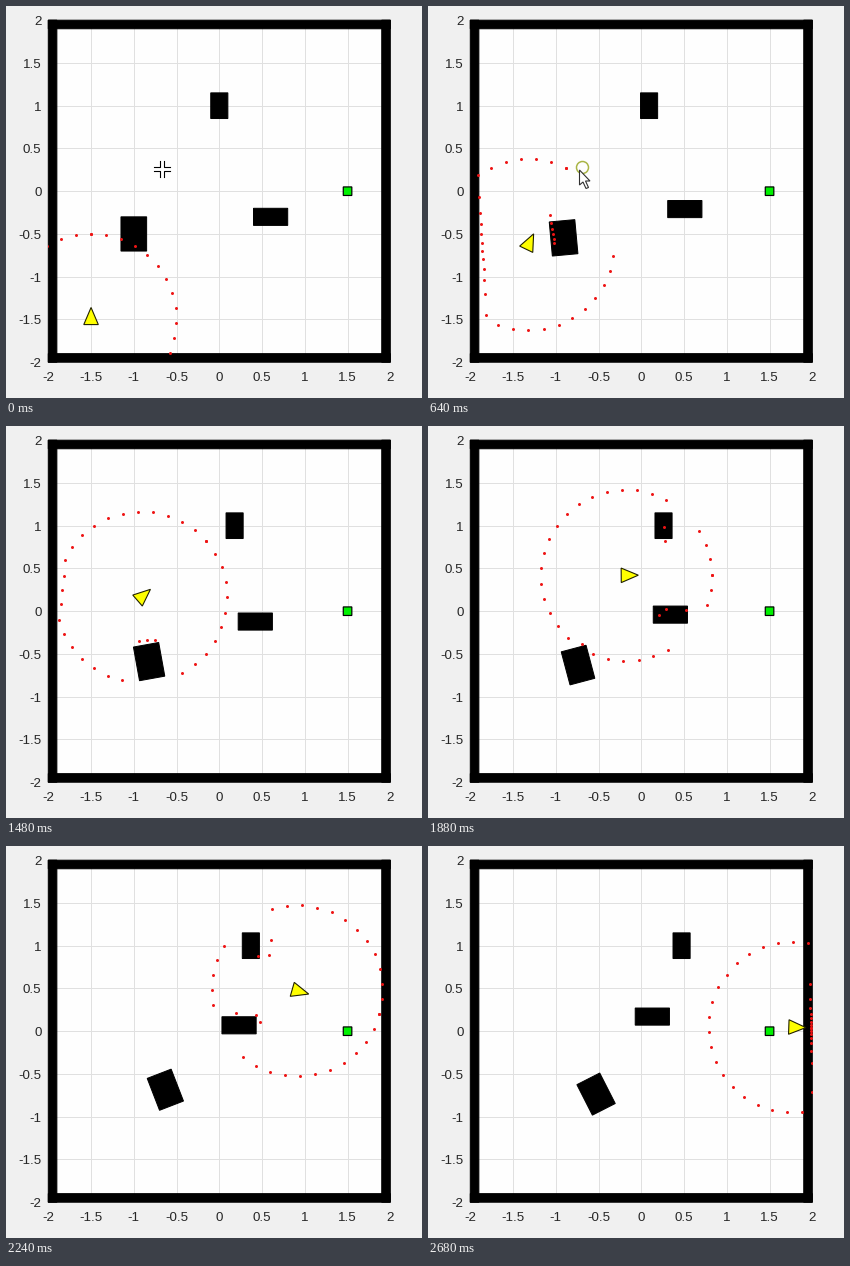
Write a matplotlib script that moves like this. It is 416 px wide and 392 px high and loops after 2800 ms.

```python
import numpy as np
import matplotlib.pyplot as plt
from matplotlib.animation import FuncAnimation
from matplotlib.patches import Circle, Polygon, Rectangle

W, H, DPI = 416, 392, 100
PX = 72 / DPI            # one pixel in points
FRAMES, INTERVAL = 70, 40
LEFT, TOP, SIDE = 42.3, 14.2, 342
INNER = 1.9              # inner face of the walls
SPEED, LAG = 9.8, 0.0085

# simulation clock against frame number (the simulation runs unevenly)
TICKS = [1, 16, 29, 37, 47, 56, 67]
CLOCK = [0, .091, .118, .179, .260, .369, .471]

# way points of the robot: clock time, x, y, heading in degrees
WAY = np.array([
    (0, -1.500, -1.500, 90), (.075, -1.396, -.762, 58),
    (.091, -1.320, -.625, 64.3), (.118, -1.240, -.333, 65.5),
    (.179, -.911, .164, 41), (.260, -.175, .420, .5),
    (.369, .911, .473, -16), (.450, 1.580, .060, -5),
    (.471, 1.785, .047, -2)])

# obstacles: start, velocity, size, spin
BOXES = [((0, 1), (1, 0), (.2, .3), 0),
         ((.6, -.3), (-1, 1), (.4, .2), 0),
         ((-1, -.5), (1, -.5), (.3, .4), 1)]

ROBOT = np.array([(.14, 0), (-.06, .085), (-.06, -.085)])
BEAMS = np.linspace(0, 2 * np.pi, 36)


def rotate(points, angle):
    c, s = np.cos(angle), np.sin(angle)
    return np.asarray(points) @ np.array([(c, s), (-s, c)])


def pose(t):
    """Position and heading on a Hermite path through the way points."""
    times = WAY[:, 0]
    k = int(np.clip(np.searchsorted(times, t, 'right') - 1, 0, len(times) - 2))
    d = times[k + 1] - times[k]
    u = (t - times[k]) / d
    p, q = WAY[k, 1:3], WAY[k + 1, 1:3]
    a, b = np.radians(WAY[k:k + 2, 3])
    m = SPEED * d * np.array([np.cos(a), np.sin(a)])
    n = SPEED * d * np.array([np.cos(b), np.sin(b)])
    pos = ((2*u**3 - 3*u**2 + 1) * p + (u**3 - 2*u**2 + u) * m
           + (3*u**2 - 2*u**3) * q + (u**3 - u**2) * n)
    vel = (6 * (u**2 - u) * (p - q) + (3*u**2 - 4*u + 1) * m
           + (3*u**2 - 2*u) * n)
    return pos, np.arctan2(vel[1], vel[0])


def box_state(box, t):
    start, vel, size, spin = box
    return np.add(start, np.multiply(vel, t)), np.array(size) / 2, spin * t


def slab(origin, rays, half):
    """Entry and exit distance of each ray through a centred rectangle."""
    rays = np.where(np.abs(rays) < 1e-9, 1e-9, rays)
    a, b = (-half - origin) / rays, (half - origin) / rays
    return np.minimum(a, b).max(axis=1), np.maximum(a, b).min(axis=1)


def scan(t):
    """Beam lengths, limited to 1, measured at clock time t."""
    pos, head = pose(t)
    rays = np.column_stack([np.cos(head + BEAMS), np.sin(head + BEAMS)])
    _, wall = slab(pos, rays, INNER)
    reach = np.clip(wall, 0, 1)
    for box in BOXES:
        centre, half, turn = box_state(box, t)
        near, far = slab(rotate(pos - centre, -turn), rotate(rays, -turn), half)
        hit = (near < far) & (near > 0)
        reach = np.where(hit, np.minimum(reach, near), reach)
    return reach


fig = plt.figure(figsize=(W / DPI, H / DPI), dpi=DPI, facecolor='#f0f0f0')
ax = fig.add_axes([LEFT / W, 1 - (TOP + SIDE) / H, SIDE / W, SIDE / H],
                  facecolor='#fefefe')
ax.set(xlim=(-2, 2), ylim=(-2, 2))
for spine in ax.spines.values():
    spine.set_visible(False)
ax.set_xticks([])
ax.set_yticks([])

# overlay in pixels for labels and the pointer
top = fig.add_axes([0, 0, 1, 1])
top.set(xlim=(0, W), ylim=(H, 0))
top.axis('off')

unit = SIDE / 4
font = dict(family='Liberation Sans', size=13.33 * PX, color='#262626')
for v in np.arange(-2, 2.1, .5):
    if abs(v) < 2:
        style = dict(color='#e0e0e0', lw=PX, zorder=1)
        ax.axvline(v, **style)
        ax.axhline(v, **style)
    x, y = LEFT + (v + 2) * unit, TOP + (2 - v) * unit
    top.text(x, 375, f'{v:g}', ha='center', va='baseline', **font)
    top.text(35.5, y + 4.8, f'{v:g}', ha='right', va='baseline', **font)

solid = dict(fc='black', ec='black', lw=PX, snap=False)
thick = 2 - INNER
for x, y, w, h in [(-2, -2, 4, thick), (-2, INNER, 4, thick),
                   (-2, -2, thick, 4), (INNER, -2, thick, 4)]:
    ax.add_patch(Rectangle((x, y), w, h, clip_on=False, zorder=2, **solid))

ax.add_patch(Rectangle((1.45, -.05), .1, .1, fc='#00f000', ec='black',
                       lw=1.2 * PX, snap=False, zorder=3))
blocks = [ax.add_patch(Polygon(np.zeros((4, 2)), zorder=3, **solid))
          for _ in BOXES]
robot = ax.add_patch(Polygon(ROBOT, fc='#ffff00', ec='#202000',
                             lw=1.1 * PX, zorder=4))
dots, = ax.plot([], [], 'o', ms=3 * PX, mfc='#ee1414', mew=0, snap=False,
                zorder=5)

# pointer shapes: an open cross, then an arrow with a click ring
CX, CY = 155.5, 162.5
cross = [top.add_patch(Rectangle((CX - w / 2, CY - h / 2), w, h, fc='white', lw=0))
         for w, h in [(16, 4), (4, 16)]]
for sx in (-1, 1):
    for sy in (-1, 1):
        cross += top.plot([CX + 8 * sx, CX + 2 * sx, CX + 2 * sx],
                          [CY + 2 * sy, CY + 2 * sy, CY + 8 * sy],
                          color='black', lw=1.1 * PX)
ring = top.add_patch(Circle((154.5, 161.5), 6, fill=False, ec='#a9b545',
                            lw=1.5 * PX))
shape = [(0, 0), (0, 15), (3.5, 12), (6.5, 18.5), (9, 17.5), (6, 11), (10.5, 11)]
arrow = top.add_patch(Polygon(np.add(shape, (151.5, 164)), fc='white',
                              ec='#303030', lw=1.1 * PX))


def draw(n):
    t = np.interp(n, TICKS, CLOCK)
    for box, block in zip(BOXES, blocks):
        centre, half, turn = box_state(box, t)
        corners = half * np.array([(-1, -1), (1, -1), (1, 1), (-1, 1)])
        block.set_xy(centre + rotate(corners, turn))

    pos, head = pose(t)
    robot.set_xy(pos + rotate(ROBOT, head))
    # beams are measured one step earlier than they are drawn
    reach = scan(max(t - LAG, 0)) if n > 1 else np.ones(len(BEAMS))
    dots.set_data(pos[0] + reach * np.cos(head + BEAMS),
                  pos[1] + reach * np.sin(head + BEAMS))

    for part in cross:
        part.set_visible(n < 2)
    ring.set_visible(2 <= n < 20)
    arrow.set_visible(2 <= n < 22)
    return [*blocks, robot, dots, *cross, ring, arrow]


anim = FuncAnimation(fig, draw, frames=FRAMES, interval=INTERVAL,
                     repeat=True, repeat_delay=0, blit=False)
plt.show()
```
